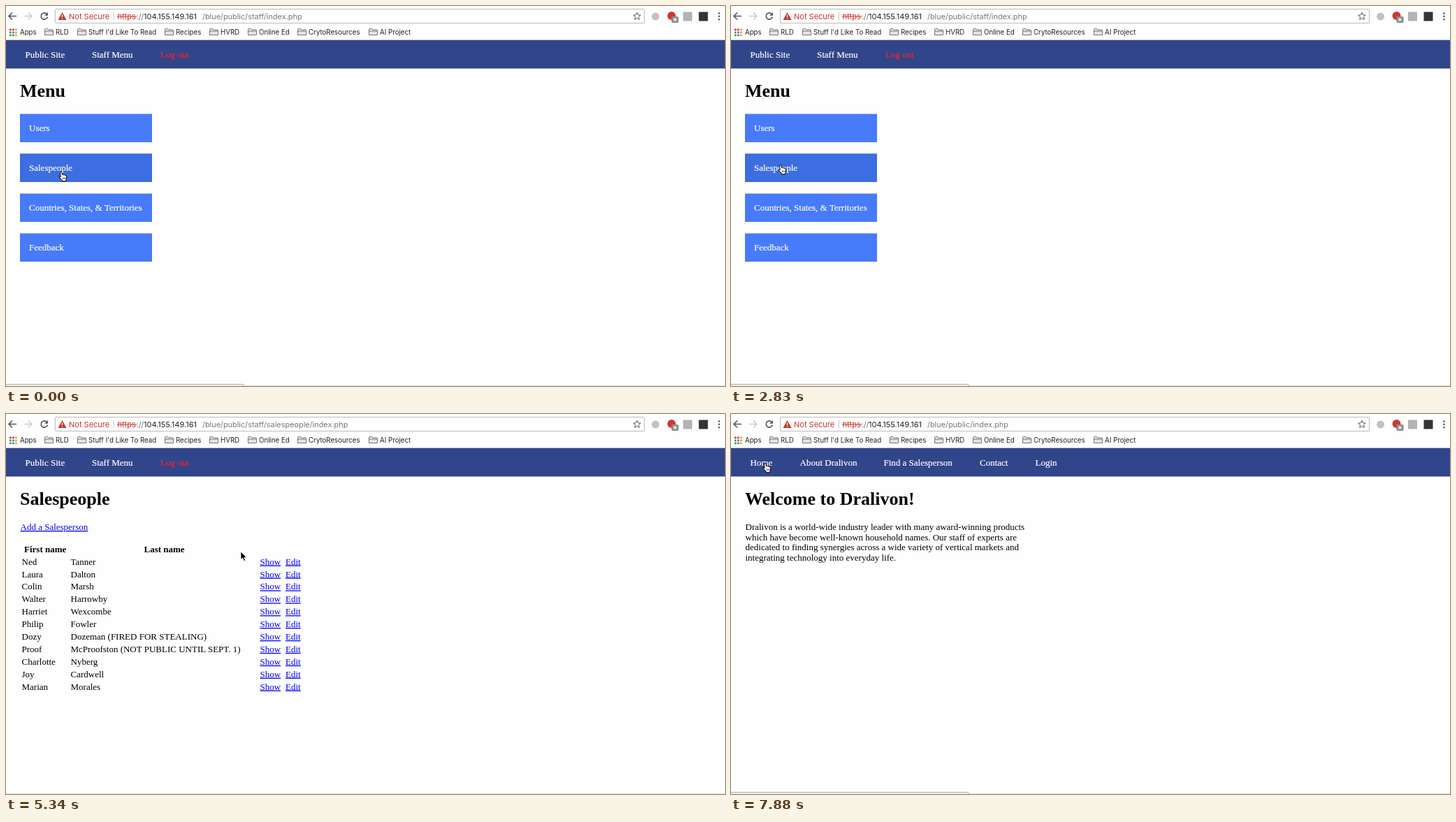
An HTML page that plays this animation: 1029x544 px, repeating every 8 s.

```html
<!DOCTYPE html>
<html lang="en">
<head>
<meta charset="utf-8">
<title>Staff menu walkthrough</title>
<style>
html, body { margin: 0; width: 100%; height: 100%; overflow: hidden; background: #fefefe; }
svg { display: block; width: 100%; height: 100%; }
text { font: 13px "Liberation Serif", Times, serif; white-space: pre; }
.ui text { font: 9.7px Inter, Roboto, sans-serif; fill: #222; }
.ui .addr { font-size: 11px; }
.ui .path { font-size: 10.9px; fill: #777; }
.ui .red { fill: #c5372c; }
.h1 { font-size: 26px; font-weight: bold; }
.bold { font-weight: bold; }
.nav text, .btn text { fill: #fff; stroke: #fff; stroke-width: .2px; }
.nav .out { fill: #f4232d; stroke: #f4232d; }
.link { fill: #0000ee; text-decoration: underline; }
.btn rect { fill: #477bfa; }

/* Everything changes in hard steps on one 8 s loop. */
.a { animation: 8s step-end infinite; }
#menu { animation-name: menu; }
#list { animation-name: list; }
#home { animation-name: home; }
#staffNav { animation-name: staffNav; }
#hover { animation-name: hover; }
#bubble { animation-name: bubble; }
#reload { animation-name: reload; }
#stop { animation-name: stop; }
#cursor { animation-name: move; }
#hand { animation-name: hand; }
#arrow { animation-name: arrow; }
@keyframes menu { 0% { opacity: 1 } 48.375%, 100% { opacity: 0 } }
@keyframes list { 0% { opacity: 0 } 48.375% { opacity: 1 } 96.625%, 100% { opacity: 0 } }
@keyframes home { 0% { opacity: 0 } 96.625%, 100% { opacity: 1 } }
@keyframes staffNav { 0% { opacity: 1 } 96.625%, 100% { opacity: 0 } }
@keyframes hover { 0%, 29.875% { opacity: 1 } 18.625% { opacity: 0 } 100% { opacity: 1 } }
@keyframes bubble {
  0%, 31.75%, 92.875% { opacity: 1 }
  24.25%, 59.375% { opacity: 0 }
  100% { opacity: 1 }
}
@keyframes stop { 0%, 48.375%, 96.625% { opacity: 0 } 39.125%, 94.75% { opacity: 1 } 100% { opacity: 0 } }
@keyframes reload { 0%, 48.375%, 96.625% { opacity: 1 } 39.125%, 94.75% { opacity: 0 } 100% { opacity: 1 } }
@keyframes hand { 0%, 29.875%, 91% { opacity: 1 } 18.625%, 48.375% { opacity: 0 } 100% { opacity: 1 } }
@keyframes arrow { 0%, 29.875%, 91% { opacity: 0 } 18.625%, 48.375% { opacity: 1 } 100% { opacity: 0 } }
@keyframes move {
  0% { transform: translate(75px, 236px) }
  1.875% { transform: translate(75px, 235px) }
  14.875% { transform: translate(98px, 235px) }
  16.75% { transform: translate(182px, 234px) }
  18.625% { transform: translate(248px, 254px) }
  20.5% { transform: translate(258px, 256px) }
  22.375% { transform: translate(262px, 257px) }
  24.25% { transform: translate(263px, 257px) }
  26.125% { transform: translate(260px, 256px) }
  28% { transform: translate(235px, 250px) }
  29.875% { transform: translate(158px, 235px) }
  31.75% { transform: translate(105px, 229px) }
  33.625% { transform: translate(74px, 227px) }
  35.375% { transform: translate(67px, 226px) }
  40.875% { transform: translate(70px, 226px) }
  44.625% { transform: translate(92px, 225px) }
  46.5% { transform: translate(172px, 226px) }
  48.375% { transform: translate(310px, 229px) }
  50.25% { transform: translate(420px, 232px) }
  52% { transform: translate(459px, 233px) }
  55.625% { transform: translate(453px, 231px) }
  57.5% { transform: translate(426px, 223px) }
  59.375% { transform: translate(382px, 211px) }
  61.25% { transform: translate(348px, 201px) }
  63.125% { transform: translate(335px, 198px) }
  66.75% { transform: translate(336px, 197px) }
  76.125% { transform: translate(326px, 190px) }
  78% { transform: translate(295px, 168px) }
  79.875% { transform: translate(257px, 138px) }
  81.75% { transform: translate(226px, 117px) }
  83.625% { transform: translate(188px, 104px) }
  85.5% { transform: translate(148px, 92px) }
  87.375% { transform: translate(114px, 83px) }
  89.125% { transform: translate(94px, 79px) }
  91% { transform: translate(70px, 71px) }
  92.875% { transform: translate(54px, 70px) }
  94.75% { transform: translate(47px, 69px) }
  96.625%, 100% { transform: translate(45px, 69px) }
}
</style>
</head>
<body>
<svg viewBox="0 0 1029 544" preserveAspectRatio="none">
  <defs>
    <g id="folder" stroke="#777" stroke-width="1" fill="#e4e4e4">
      <path d="M.5 9.5V1.5Q.5 .5 1.5 .5H4.5L6 2H11.5Q12.5 2 12.5 3V9.5Z"/>
      <path d="M.5 4H12.5" fill="none"/>
    </g>
  </defs>
  <rect width="1029" height="544" fill="#fefefe"/>

  <g class="ui">
    <path d="M0 48.5H1029" stroke="#c4c4c4"/>
    <g fill="none" stroke-width="1.6">
      <path d="M15 14.5H4.5M9 9.5L4 14.5L9 19.5" stroke="#555"/>
      <path d="M26 14.5H36.500M32 9.500L37 14.500L32 19.500" stroke="#ccc"/>
      <g id="reload" class="a"><path d="M58.200 11.400A4.600 4.600 0 1 0 59.300 15.500" stroke="#555"/><path d="M60 9V13.800H55.200Z" fill="#555"/></g>
      <path id="stop" class="a" d="M50 10L59 19M59 10L50 19" stroke="#555"/>
    </g>
    <rect x="70.500" y="4.500" width="843" height="20" rx="1.500" fill="#fff" stroke="#bbb"/>
    <path d="M80.500 9L86.500 20H74.500Z" fill="#c5372c"/>
    <path d="M80.500 12.500V16M80.500 17.200V18.600" stroke="#fff" stroke-width="1.300"/>
    <text class="addr red" x="90" y="18.500">Not Secure</text>
    <path d="M154.500 9V20" stroke="#ccc"/>
    <text class="addr red" x="159.500" y="18.500">https</text>
    <path d="M159 15.200H187" stroke="#c5372c"/>
    <text class="addr path" x="186.500" y="18.500">://</text>
    <text class="addr" x="197" y="18.500">104.155.149.161</text>
    <path d="M903 9.300L904.500 12.900L908.300 13.200L905.400 15.700L906.300 19.500L903 17.400L899.700 19.500L900.600 15.700L897.700 13.200L901.500 12.900Z" fill="none" stroke="#555"/>
    <circle cx="929.500" cy="15" r="5.500" fill="#c2c2c2"/>
    <circle cx="952.500" cy="14" r="6" fill="#cb3a32"/>
    <rect x="952.500" y="15" width="10" height="9" rx="1.500" fill="#8b8b8b"/>
    <path d="M955.500 17.500L959.500 21.500M959.500 17.500L955.500 21.500" stroke="#fff" stroke-width="1.200"/>
    <rect x="969" y="8.500" width="13" height="13" fill="#b3b3b3"/>
    <rect x="991.500" y="8.500" width="13" height="13" fill="#333"/>
    <g fill="#555"><circle cx="1020.500" cy="10.500" r="1.300"/><circle cx="1020.500" cy="14.800" r="1.300"/><circle cx="1020.500" cy="19.100" r="1.300"/></g>
    <g id="apps"></g>
    <g id="marks"><text x="20" y="41">Apps</text></g>
  </g>

  <rect y="49" width="1029" height="40.500" fill="#31458a"/>
  <g id="staffNav" class="a nav">
    <text x="27.500" y="74">Public Site</text>
    <text x="123" y="74">Staff Menu</text>
    <text class="out" x="221" y="74">Log out</text>
  </g>

  <g id="menu" class="a">
    <g class="ui"><text class="path" x="281" y="18.500">/blue/public/staff/index.php</text></g>
    <text class="h1" x="20" y="130">Menu</text>
    <g class="btn">
      <rect x="20" y="154.500" width="189" height="40.500"/>
      <rect x="20" y="211.500" width="189" height="40.500"/>
      <rect x="20" y="268.500" width="189" height="40.500"/>
      <rect x="20" y="325.500" width="189" height="40.500"/>
      <rect id="hover" class="a" x="20" y="211.500" width="189" height="40.500" style="fill:#3c6ee1"/>
      <text x="33" y="179">Users</text>
      <text x="33" y="236">Salespeople</text>
      <text x="33" y="293">Countries, States, &amp; Territories</text>
      <text x="33" y="350">Feedback</text>
    </g>
  </g>

  <g id="list" class="a">
    <g class="ui"><text class="path" x="281" y="18.500">/blue/public/staff/salespeople/index.php</text></g>
    <text class="h1" x="20" y="130">Salespeople</text>
    <text class="link" x="20.500" y="166">Add a Salesperson</text>
    <text class="bold" x="26" y="198">First name</text>
    <text class="bold" x="197.500" y="198">Last name</text>
  </g>

  <g id="home" class="a">
    <g class="ui"><text class="path" x="281" y="18.500">/blue/public/index.php</text></g>
    <g class="nav">
      <text x="27.500" y="74">Home</text>
      <text x="98.500" y="74">About Dralivon</text>
      <text x="218.500" y="74">Find a Salesperson</text>
      <text x="356" y="74">Contact</text>
      <text x="435.500" y="74">Login</text>
    </g>
    <text class="h1" x="20" y="130">Welcome to Dralivon!</text>
    <text x="20.500" y="166">Dralivon is a world-wide industry leader with many award-winning products</text>
    <text x="20.500" y="180.700">which have become well-known household names. Our staff of experts are</text>
    <text x="20.500" y="195.400">dedicated to finding synergies across a wide variety of vertical markets and</text>
    <text x="20.500" y="210">integrating technology into everyday life.</text>
  </g>

  <path d="M0 543.500H1029" stroke="#e2e2e2"/>
  <path id="bubble" class="a" d="M-1 541.500H338Q341 541.500 341 544.500H-1Z" fill="#ececec" stroke="#b4b4b4"/>

  <g id="cursor" class="a">
    <path id="arrow" class="a" d="M0 0V11.500L2.700 9L4.700 13.500L6.700 12.600L4.700 8.300H8.300Z" fill="#000" stroke="#fff" stroke-width=".8"/>
    <g id="hand" class="a">
      <path d="M3.200 8.800L2.500 3Q2.500 1.300 3.800 1.400Q4.800 1.500 5 2.800L5.500 5.700Q6.700 4.600 7.600 6Q8.800 5.200 9.600 6.500Q11.400 6 11.700 8L11.600 10.800Q11.400 12.500 10.500 13.300V14.800H5.400V13.500L1.400 9.200Q.8 7.600 2 7.500Z" fill="#fff" stroke="#000" stroke-width="1"/>
      <path d="M6.500 9.500V12M8.300 9.500V12M10 9.500V12" stroke="#000" stroke-width=".7"/>
    </g>
  </g>
</svg>
<script>
const add = (parent, tag, attrs, content = "") => {
  const el = document.createElementNS("http://www.w3.org/2000/svg", tag);
  for (const key in attrs) el.setAttribute(key, attrs[key]);
  el.textContent = content;
  document.getElementById(parent).append(el);
};

const dots = ["#d93b30", "#d93b30", "#e8a33c", "#3f9d55", "#4d7fe0", "#e8a33c", "#3f9d55", "#3f9d55", "#e8a33c"];
dots.forEach((fill, i) =>
  add("apps", "rect", { x: 5 + i % 3 * 4, y: 32.5 + Math.floor(i / 3) * 4, width: 2.7, height: 2.7, fill }));

const marks = [[55, "RLD"], [102, "Stuff I'd Like To Read"], [227, "Recipes"], [291, "HVRD"],
  [346, "Online Ed"], [417, "CrytoResources"], [519, "AI Project"]];
for (const [x, name] of marks) {
  add("marks", "use", { href: "#folder", x, y: 32 });
  add("marks", "text", { x: x + 16, y: 41 }, name);
}

const people = [["Ned", "Tanner"], ["Laura", "Dalton"], ["Colin", "Marsh"], ["Walter", "Harrowby"],
  ["Harriet", "Wexcombe"], ["Philip", "Fowler"], ["Dozy", "Dozeman (FIRED FOR STEALING)"],
  ["Proof", "McProofston (NOT PUBLIC UNTIL SEPT. 1)"], ["Charlotte", "Nyberg"],
  ["Joy", "Cardwell"], ["Marian", "Morales"]];
people.forEach(([first, last], i) => {
  const y = 215.6 + 17.9 * i;
  add("list", "text", { x: 22.5, y }, first);
  add("list", "text", { x: 92.5, y }, last);
  add("list", "text", { x: 363.5, y, class: "link" }, "Show");
  add("list", "text", { x: 400, y, class: "link" }, "Edit");
});
</script>
</body>
</html>
```
